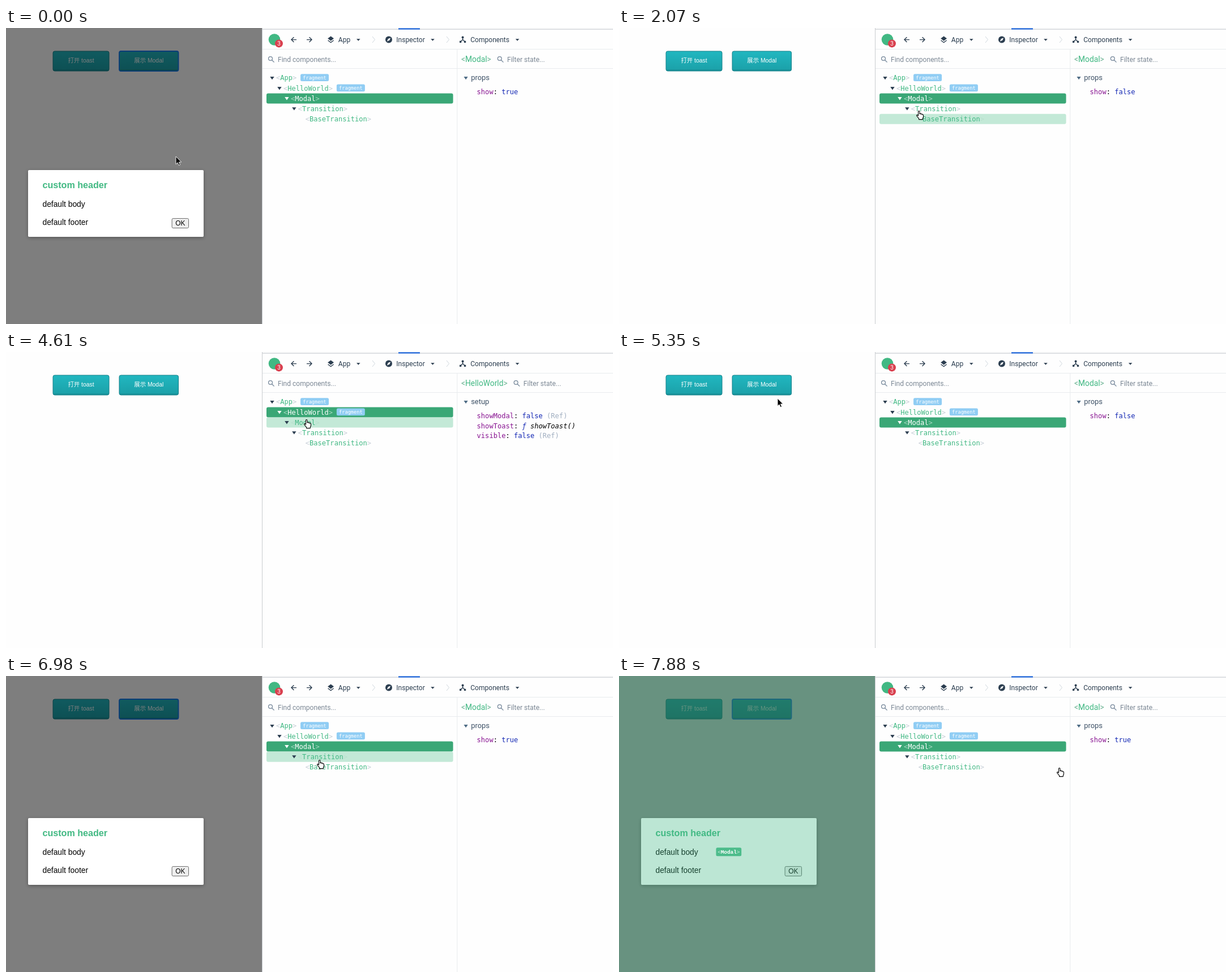
Write an HTML page that moves like this. It is 1072 px wide and 523 px high and loops after 8000 ms.

```html
<!DOCTYPE html>
<html lang="zh">
<head>
<meta charset="utf-8">
<title>Modal inspector</title>
<style>
  html, body { margin: 0; width: 100%; height: 100%; overflow: hidden; background: #fefefe; }
  svg { display: block; width: 1072px; height: 523px; }
  text { white-space: pre; }
  .ui { font: 12.07px Roboto, sans-serif; fill: #2c3e50; }
  .ui .hint { fill: #7b8794; }
  .ui .title { font-size: 13.8px; fill: #41b883; }
  .ui .title .b { fill: #6db494; }
  .ui .section { font-size: 12.94px; fill: #3d5166; }
  .mono { font: 12.07px "DejaVu Sans Mono", monospace; }
  .page { font-family: "Liberation Sans", "Noto Sans CJK SC", "Noto Sans CJK", sans-serif; }
  .btn text { font-size: 10.4px; fill: #fff; }
  .line { fill: none; stroke: #2c3e50; stroke-width: 1.4; }
  .rule { fill: none; stroke: #e8ebee; }
  .search { fill: none; stroke: #75879a; stroke-width: 1.3; }
  .row rect.bg { fill: none; }
  .row .name { fill: #41b883; }
  .row .b { fill: #c6ced6; }
  .row .tri { fill: #2c3e50; }
  .row.hover rect.bg { fill: #c3e9d7; }
  .row.hover .b { fill: #b9e0ce; }
  .row.sel rect.bg { fill: #3aa776; }
  .row.sel .name, .row.sel .tri { fill: #fff; }
  .row.sel .b { fill: #a3d8bf; }
  .tag { font-size: 8.63px; fill: #fff; }
  .key { fill: #881391; }
  .val { fill: #1428b4; }
  .ref { fill: #a0aec0; }
  .fn { font-style: italic; }
  #label { font: bold 9.35px "Liberation Mono", monospace; fill: #fff; text-anchor: middle; }
  #label .b { font-weight: normal; fill: #d2efe1; }
</style>
</head>
<body>
<svg viewBox="0 0 1072 523">
  <defs>
    <linearGradient id="teal" x2="0" y2="1">
      <stop offset="0" stop-color="#21b7c0"/>
      <stop offset="1" stop-color="#1ba0a8"/>
    </linearGradient>
    <filter id="shadow" x="-10%" y="-20%" width="120%" height="140%">
      <feDropShadow dx="0" dy="1.7" stdDeviation="3" flood-opacity=".33"/>
    </filter>
  </defs>
  <rect width="1072" height="523" fill="#fefefe"/>

  <g class="page">
    <g id="buttons"></g>
    <g id="mask">
      <rect width="452" height="523" opacity=".5"/>
      <g id="modal">
        <rect x="39" y="251" width="310" height="118" rx="2" fill="#fff" filter="url(#shadow)"/>
        <text x="64.5" y="283" font-size="16.1" font-weight="bold" fill="#42b983">custom header</text>
        <g font-size="13.8">
          <text x="64.5" y="315.5">default body</text>
          <text x="64.5" y="348">default footer</text>
        </g>
        <rect id="ok" x="293.1" y="336.6" width="29.4" height="16.8" rx="2" stroke="#6b6b6b"/>
        <text x="307.8" y="349.3" font-size="11.9" text-anchor="middle">OK</text>
      </g>
    </g>
    <g id="overlay">
      <rect id="area" fill="#41b883" fill-opacity=".35"/>
      <rect id="chip" height="15" rx="2.5" fill="#41b883" fill-opacity=".9"/>
      <text id="label" x="193.8"></text>
    </g>
  </g>

  <g class="ui">
    <rect x="452" width="620" height="523" fill="#fefefe"/>
    <rect x="453" width="619" height="2.5" fill="#f3f4f5"/>
    <path d="M453 2.5H1072" stroke="#cfd2d6"/>
    <rect x="693" width="38" height="3" fill="#4f86e0"/>
    <path d="M452.5 0V523" stroke="#c9ccd0"/>
    <path class="rule" d="M453 37.5H1072M453 71.5H1072M796.8 38V523"/>

    <circle cx="474" cy="20.5" r="10.3" fill="#41b883"/>
    <circle cx="482" cy="27.4" r="7" fill="#d9404f"/>
    <text x="482" y="31" font-size="10" text-anchor="middle" style="fill:#fff">3</text>

    <path class="line" d="M513 20.6H504.2M508.4 16.2L504 20.6L508.4 25M531 20.6H539.8M535.6 16.2L540 20.6L535.6 25"/>
    <path d="M573.6 14.4L579 18.6L573.6 22.8L568.2 18.6Z"/>
    <path class="line" d="M568.6 21.8L573.6 25.7L578.6 21.8"/>
    <circle cx="676" cy="20.5" r="6"/>
    <path fill="#fff" d="M679.2 17.3L677.3 21.8L672.8 23.7L674.7 19.2Z"/>
    <path class="line" d="M806.6 16V20.5L802.5 24.6M806.6 20.5L810.7 24.6"/>
    <path d="M801 22.8h3.3v3.3h-3.3zM808.9 22.8h3.3v3.3h-3.3z"/>
    <circle cx="806.6" cy="16.6" r="2"/>
    <text x="586.8" y="25">App</text>
    <text x="689.3" y="25">Inspector</text>
    <text x="820.2" y="25">Components</text>
    <path d="M619 19.3h6.6l-3.3 3.5zM750.2 19.3h6.6l-3.3 3.5zM899.8 19.3h6.6l-3.3 3.5z"/>
    <path fill="none" stroke="#cfd6dd" d="M647 15L651.5 20.5L647 26M778 15L782.5 20.5L778 26"/>

    <g class="search"><circle cx="467" cy="54" r="3.4"/><path d="M469.5 56.5L473.6 60.6"/></g>
    <text class="hint" x="480" y="59.6">Find components...</text>
    <text class="title" id="title" x="804" y="60"></text>
    <g id="filter">
      <g class="search"><circle cx="871.8" cy="54" r="3.4"/><path d="M874.3 56.5L878.4 60.6"/></g>
      <text class="hint" x="885" y="59.6">Filter state...</text>
    </g>
    <path d="M808.5 86h7.2l-3.6 5.2z" fill="#4d6b84"/>
    <text class="section" id="section" x="821.2" y="92.4"></text>
  </g>
  <g class="mono" id="state"></g>
  <g class="mono" id="tree"></g>

  <g id="cursor">
    <path id="arrow" d="M0 0V13.6L3.1 10.8L5.2 15.6L7.5 14.6L5.4 9.9H9.7Z" stroke="#fff" stroke-width=".9"/>
    <path id="hand" fill="#fff" stroke="#000" stroke-width="1.1" stroke-linejoin="round"
      d="M4.6 15.6V13.9L1 9.6Q.1 8 1.4 7.6Q2.4 7.5 3.5 9.1V1.8Q3.6 .5 4.7 .5Q5.9 .6 6 1.8V6Q6.2 5 7.2 5.1Q8.3 5.2 8.4 6.4Q8.7 5.6 9.6 5.8Q10.5 6 10.6 7.1Q11 6.5 11.7 6.8Q12.5 7.1 12.5 8.2V10.6Q12.4 12.4 11.3 13.9V15.6Z"/>
  </g>
</svg>
<script>
const LOOP = 8000, TICK = 148.6, LEAD = 12;
const $ = id => document.getElementById(id);
const tagged = name => `<tspan class="b">&lt;</tspan>${name}<tspan class="b">&gt;</tspan>`;

// Each track is a list of [tick, value]; a value holds until the next one.
const tracks = {
  hover: [[0, -1], [13, 4], [15, 3], [16, 2], [18, 1], [31, 2], [34, -1], [46, 4], [47, 3], [49, 2], [53, -1]],
  selected: [[0, 2], [23, 1], [33, 2]],
  show: [[0, true], [8, false], [39, true]],
  fade: [[0, 1], [8, .75], [9, .08], [10, 0], [39, .06], [40, .87], [41, 1]],
  outline: [[0, ''], [18, 'HelloWorld'], [31, ''], [48, 'Transition'], [50, 'Modal']]
};

// Pointer path: tick, x, y
const path = [
  [0, 300, 227], [1, 258, 246], [2, 198, 288], [3, 228, 322], [4, 284, 340], [5, 308, 341],
  [8, 308, 341], [9, 312, 336], [10, 340, 305], [12, 460, 192], [13, 506, 158], [14, 525, 146],
  [15, 525, 136], [16, 525, 126], [17, 525, 118], [18, 526, 110], [21, 526, 102],
  [25, 526, 102], [28, 525, 113], [30, 525, 113], [31, 526, 119], [33, 525, 119],
  [34, 462, 122], [35, 362, 106], [36, 280, 82], [37, 262, 73], [39, 250, 64], [40, 250, 63],
  [41, 254, 67], [43, 345, 115], [46, 538, 155], [47, 549, 148], [48, 538, 139],
  [49, 525, 128], [51, 518, 124], [52, 518, 124], [53, 773, 162]
];

const names = ['App', 'HelloWorld', 'Modal', 'Transition', 'BaseTransition'];

function button(x, w, label, id) {
  return `<g class="btn"><rect id="${id}" x="${x + .5}" y="41" width="${w - 1}" height="35" rx="3" fill="url(#teal)" stroke="#168089"/>
    <path d="M${x + 2} 74.5H${x + w - 2}" stroke="#14828a" stroke-width="2" opacity=".6"/>
    <text x="${x + w / 2}" y="61.3" text-anchor="middle">${label}</text></g>`;
}

function row(name, i) {
  const top = 79.3 + 18.1 * i, x = 477 + 12.95 * i;
  const tri = i < 4 ? `<path class="tri" d="M${x - 10.7} ${top + 6.6}h7.4l-3.7 5.4z"/>` : '';
  const tagX = x + 7.27 * (name.length + 2) + 6.7;
  const tag = i < 2 ? `<rect x="${tagX}" y="${top + 2}" width="50" height="12.8" rx="2.5" fill="#90cdf4"/>
    <text class="tag" x="${tagX + 4.2}" y="${top + 11.2}">fragment</text>` : '';
  return `<g class="row"><rect class="bg" x="460" y="${top}" width="329.6" height="18.1" rx="3"/>${tri}
    <text class="name" x="${x}" y="${top + 13.1}">${tagged(name)}</text>${tag}</g>`;
}

const ref = '<tspan class="val">false</tspan> <tspan class="ref">(Ref)</tspan>';
const setupState = [
  ['showModal', ref],
  ['showToast', '<tspan class="val fn">ƒ</tspan> <tspan class="fn">showToast()</tspan>'],
  ['visible', ref]
];

$('buttons').innerHTML = button(82.5, 100, '打开 toast', 'open') + button(199.5, 105.5, '展示 Modal', 'launch');
$('tree').innerHTML = names.map(row).join('');
const rows = [...$('tree').children];

const held = (track, k) => track.filter(s => s[0] <= k).pop()[1];

function pointer(k) {
  const i = path.findLastIndex(p => p[0] <= k);
  const a = path[i], b = path[i + 1] || a;
  const u = a === b ? 0 : (k - a[0]) / (b[0] - a[0]);
  return [a[1] + (b[1] - a[1]) * u, a[2] + (b[2] - a[2]) * u];
}

function setAttrs(el, attrs) {
  for (const key in attrs) el.setAttribute(key, attrs[key]);
}

function drawState(selected, show) {
  const modal = selected === 2;
  const entries = modal ? [['show', `<tspan class="val">${show}</tspan>`]] : setupState;
  $('title').innerHTML = tagged(names[selected]);
  $('section').textContent = modal ? 'props' : 'setup';
  setAttrs($('filter'), { transform: `translate(${modal ? 0 : 28.8} 0)` });
  $('state').innerHTML = entries.map(([key, value], i) =>
    `<text x="831.6" y="${117.3 + 17.25 * i}"><tspan class="key">${key}</tspan>: ${value}</text>`).join('');
}

function drawOutline(name) {
  $('overlay').style.display = name ? '' : 'none';
  if (!name) return;
  const small = name === 'HelloWorld';
  const mid = small ? 58.8 : 310.8, w = 5.61 * (name.length + 2) + 5.5;
  setAttrs($('area'), small
    ? { x: 82.5, y: 40.5, width: 222.5, height: 36 }
    : { x: 0, y: 0, width: 452, height: 523 });
  setAttrs($('chip'), { x: 193.8 - w / 2, y: mid - 7.5, width: w });
  $('label').innerHTML = tagged(name);
  setAttrs($('label'), { y: mid + 2.9 });
}

function draw(k) {
  const now = {};
  for (const key in tracks) now[key] = held(tracks[key], k);

  rows.forEach((el, i) => {
    el.classList.toggle('sel', i === now.selected);
    el.classList.toggle('hover', i === now.hover);
  });
  drawState(now.selected, now.show);
  drawOutline(now.outline);

  const scale = 1 + .1 * (1 - now.fade);
  setAttrs($('mask'), { opacity: now.fade });
  setAttrs($('modal'), { transform: `translate(194 310) scale(${scale}) translate(-194 -310)` });
  setAttrs($('ok'), { fill: k >= 5 && k < 10 ? '#e5e5e5' : '#efefef' });
  setAttrs($('launch'), now.show
    ? { stroke: '#1478f0', 'stroke-width': 1.8 }
    : { stroke: '#168089', 'stroke-width': 1 });

  const [x, y] = pointer(k), hand = x >= 460;
  setAttrs($('cursor'), { transform: `translate(${x} ${y})` });
  $('hand').style.display = hand ? '' : 'none';
  $('arrow').style.display = hand ? 'none' : '';
}

const start = performance.now();
let last = -1;
function frame() {
  const t = (performance.now() - start) % LOOP;
  const k = Math.floor((t + LEAD) / TICK);
  if (k !== last) draw(last = k);
  requestAnimationFrame(frame);
}
frame();
</script>
</body>
</html>
```
